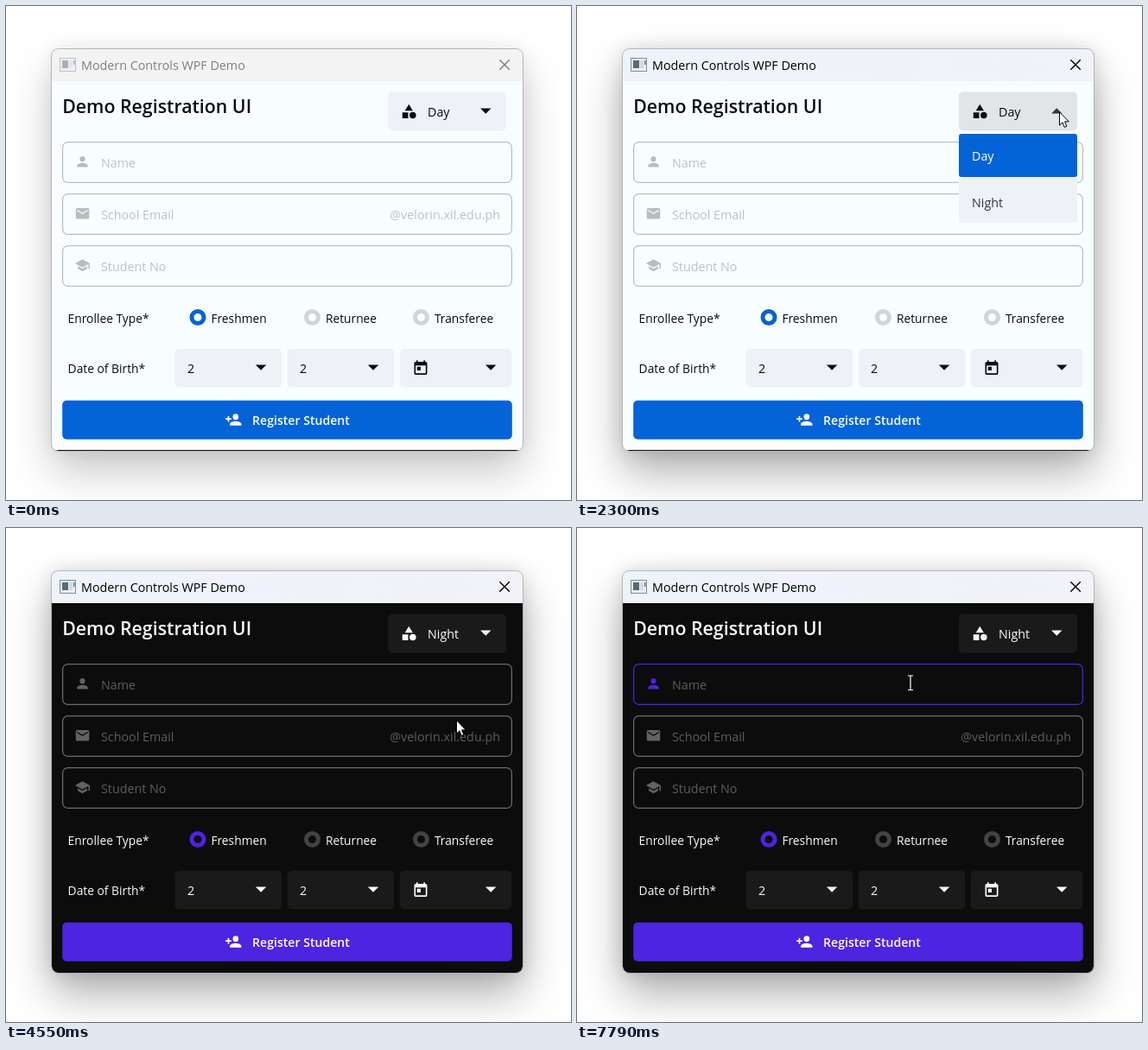
Animation, 654 px wide and 572 px high, one loop 8000 ms. Source, as an HTML page:

```html
<!DOCTYPE html>
<html lang="en">
<head>
<meta charset="utf-8">
<title>Registration form</title>
<style>
html, body { margin: 0; width: 100%; height: 100%; overflow: hidden; background: #fff; }
#shadow {
  position: absolute; left: 53px; top: 50px; width: 545px; height: 465px; border-radius: 8px;
  box-shadow: 0 24px 50px rgba(0, 0, 0, calc(.22 + .1 * var(--active))),
              0 0 22px rgba(0, 0, 0, calc(.07 + .06 * var(--active)));
}
svg { position: absolute; left: 0; top: 0; font: 14.3px "Open Sans", "Noto Sans", sans-serif; }
svg {
  --body: #f8feff; --box: #eef1f5; --line: #b9c0c2; --hint: #bcc2c4; --mark: #b9bdbe;
  --ring: #d2d5d6; --ink: #0a0a14; --accent: #0463d7; --edge: #111;
}
svg.night {
  --body: #0c0c0c; --box: #1a1a1a; --line: #6b6b6b; --hint: #5d5d5d; --mark: #626262;
  --ring: #434343; --ink: #fafafa; --accent: #4d24e0; --edge: #0c0c0c;
}
text, .ink { fill: var(--ink); }
.label { font-size: 13.8px; }
.field { fill: none; stroke: var(--line); stroke-width: 1.25; }
.hint { fill: var(--hint); }
.mark { fill: var(--mark); }
.box { fill: var(--box); }
.ring { fill: none; stroke: var(--ring); stroke-width: 5; }
.ring.on { stroke: var(--accent); }
.accent { fill: var(--accent); }
.white { fill: #fff; }
.open .theme { fill: #e1e5e8; }
.open #themeArrow { fill: #33373b; }
#title text { fill: #000; }
</style>
</head>
<body>
<div id="shadow"></div>
<svg id="stage" width="654" height="572" viewBox="0 0 654 572">
  <defs>
    <linearGradient id="barFill"><stop stop-color="#eef3fb"/><stop offset="1" stop-color="#f2f2f9"/></linearGradient>
    <clipPath id="frame"><rect x="53" y="50" width="545" height="465" rx="8"/></clipPath>
    <path id="account" d="M12 4a4 4 0 0 1 0 8a4 4 0 0 1 0-8M12 14c4.42 0 8 1.79 8 4v2H4v-2c0-2.21 3.58-4 8-4z"/>
    <path id="email" d="M20 8l-8 5-8-5V6l8 5 8-5M20 4H4a2 2 0 0 0-2 2v12a2 2 0 0 0 2 2h16a2 2 0 0 0 2-2V6a2 2 0 0 0-2-2z"/>
    <path id="school" d="M12 3L1 9l11 6 9-4.91V17h2V9M5 13.18v4L12 21l7-3.82v-4L12 17z"/>
    <path id="shapes" d="M11 13.5v8H3v-8zM12 2l5.5 9h-11zM17.5 13a4.5 4.5 0 0 1 0 9a4.5 4.5 0 0 1 0-9z"/>
    <path id="add" d="M15 14c-2.67 0-8 1.33-8 4v2h16v-2c0-2.67-5.33-4-8-4M6 10V7H4v3H1v2h3v3h2v-3h3v-2M15 12a4 4 0 0 0 0-8a4 4 0 0 0 0 8z"/>
    <path id="calendar" d="M7 10h5v5H7M19 19H5V8h14M19 3h-1V1h-2v2H8V1H6v2H5a2 2 0 0 0-2 2v14a2 2 0 0 0 2 2h14a2 2 0 0 0 2-2V5a2 2 0 0 0-2-2z"/>
    <path id="arrow" d="M-6.2-3h12.4L0 3.2z"/>
  </defs>

  <g clip-path="url(#frame)">
    <rect x="53" y="50" width="545" height="37" fill="#f3f3f4"/>
    <rect id="bar" x="53" y="50" width="545" height="37" fill="url(#barFill)"/>
    <rect x="53" y="87" width="545" height="428" style="fill:var(--body)"/>
    <rect x="53" y="514" width="545" height="1" style="fill:var(--edge)"/>
  </g>
  <rect x="52.5" y="49.5" width="546" height="466" rx="8" fill="none" stroke="#b3b7ba"/>

  <g id="title">
    <rect x="62.5" y="60.5" width="18" height="15" fill="#eceff1" stroke="#858b90"/>
    <rect x="65" y="63" width="7" height="9" fill="#566b80"/>
    <rect x="73" y="63" width="4" height="9" fill="#d3d9de"/>
    <rect x="78" y="63" width="1.5" height="5" fill="#3f78c8"/>
    <text x="87" y="74">Modern Controls WPF Demo</text>
    <path d="M571.3 62.3l11.5 11.5m0-11.5l-11.5 11.5" stroke="#000" stroke-width="1.4"/>
  </g>

  <text x="65.2" y="124" font-size="21.3" font-weight="600">Demo Registration UI</text>
  <g id="form"></g>

  <rect class="box theme" x="442" y="99.5" width="137" height="45" rx="5"/>
  <text id="choice" x="488" y="128"></text>
  <use id="themeArrow" class="ink" href="#arrow"/>

  <g id="popup">
    <rect class="box" x="442" y="148" width="137" height="103" rx="3"/>
    <rect class="accent" x="442" y="148" width="137" height="50" rx="3"/>
    <text class="white" x="457" y="179">Day</text>
    <text x="457" y="233" style="fill:#33363c">Night</text>
  </g>

  <rect id="caret" class="ink" x="112" y="170" width="1.3" height="21"/>
  <path id="pointer" d="M.5.7v15.4l3.5-3.3 2.3 5.6 2.6-1.1-2.3-5.4h4.7z" fill="#fff" stroke="#000"/>
  <path id="beam" d="M-3-8h2.5l.5.5.5-.5H3M0-7.5V8M-3 8.5h2.5L0 8l.5.5H3" fill="none" stroke="#fff" stroke-width="1.2"/>
</svg>
<script>
const $ = id => document.getElementById(id);
const stage = $("stage");

const icon = (name, x, y, cls = "ink", size = 20) =>
  `<use href="#${name}" class="${cls}" transform="translate(${x} ${y}) scale(${size / 24})"/>`;
const text = (s, x, y, cls = "", extra = "") => `<text class="${cls}" x="${x}" y="${y}" ${extra}>${s}</text>`;
const arrow = (x, y) => `<use href="#arrow" class="ink" x="${x}" y="${y}"/>`;

const field = (hint, name, y, id) => `<g id="${id}">
  <rect class="field" x="65.6" y="${y}" width="519.8" height="46.8" rx="6"/>
  ${icon(name, 79.2, y + 13.4, "mark", 18.6)}${text(hint, 110, y + 29.4, "hint")}</g>`;
const radio = (s, x, on = "") =>
  `<circle class="ring ${on}" cx="${x}" cy="360.5" r="7"/>` + text(s, x + 15.4, 367, "label");
const combo = (x, w, content) =>
  `<rect class="box" x="${x}" y="397" width="${w}" height="44.5" rx="5"/>${content}` + arrow(x + w - 24.1, 418.5);

$("form").innerHTML =
  field("Name", "account", 157.6, "name") +
  field("School Email", "email", 217.6, "mail") +
  field("Student No", "school", 277.6, "number") +
  text("@velorin.xil.edu.ph", 572, 247, "hint", 'text-anchor="end"') +
  text("Enrollee Type*", 71.6, 367, "label") +
  radio("Freshmen", 222, "on") + radio("Returnee", 354.5) + radio("Transferee", 480.5) +
  text("Date of Birth*", 71.6, 425, "label") +
  combo(195.5, 123.7, text("2", 210, 425)) +
  combo(325.7, 123.5, text("2", 340, 425)) +
  combo(455.8, 129.5, icon("calendar", 470, 409.5)) +
  '<rect class="accent" x="65.2" y="456.8" width="520.6" height="45" rx="5"/>' +
  icon("add", 253.3, 469, "white") +
  text("Register Student", 285, 485, "label white", 'style="font-size:14.1px" font-weight="600"');
$("choice").insertAdjacentHTML("beforebegin", icon("shapes", 456.3, 112));

// Pointer path: time, x, y
const path = [
  [1060, 646, 182], [1340, 594, 142], [1550, 568, 126], [1760, 558, 122],
  [2900, 558, 122], [3310, 536, 172], [3730, 521, 214], [4090, 521, 222],
  [5670, 521, 222], [6230, 435, 215], [6510, 406, 204], [6790, 386, 179], [8000, 386, 179]
];

function pointerAt(t) {
  const phase = t < 2000 ? 10 : t < 5000 ? 30 : 0;
  const q = Math.max(1060, t - (t - phase) % 70);
  const i = path.findIndex(p => p[0] > q);
  const [a, x, y] = path[i - 1], [b, x2, y2] = path[i];
  const k = (q - a) / (b - a);
  return [x + (x2 - x) * k, y + (y2 - y) * k];
}

const steps = (t, start, n) => Math.min(1, Math.max(0, (Math.floor((t - start) / 70) + 1) / n));
const show = (el, on) => { el.style.opacity = +on; };

function draw(t) {
  const night = t >= 4550, open = t >= 2090 && !night;
  const active = steps(t, 2090, 4);
  stage.setAttribute("class", night ? "night" : open ? "open" : "");

  $("shadow").style.setProperty("--active", active);
  show($("bar"), active);
  const idle = t < 70 ? .48 : t < 130 ? .46 : .44;
  show($("title"), idle + (1 - idle) * active);

  $("choice").textContent = night ? "Night" : "Day";
  $("themeArrow").setAttribute("transform", `translate(555.3 121.5) scale(1 ${open ? -1 : 1})`);
  show($("popup"), t < 4350 ? active : t < 4480 ? .5 : 0);

  const focus = steps(t, 7190, 3);
  const tint = base => `color-mix(in srgb, var(--accent) ${focus * 100}%, ${base})`;
  const name = $("name");
  name.querySelector("rect").style.stroke = focus ? tint("#6b6b6b") : "";
  name.querySelector("use").style.fill = focus ? tint("#626262") : "";
  show($("caret"), t >= 7260 && t < 7790);

  const [x, y] = pointerAt(t);
  const beam = t >= 5740 && (y > 217 || y < 205);
  for (const id of ["pointer", "beam"]) $(id).setAttribute("transform", `translate(${x} ${y})`);
  show($("beam"), beam);
  show($("pointer"), t < 1060 || beam ? 0 : t >= 4480 && !night ? .5 : 1);
}

const start = performance.now();
function loop() {
  draw((performance.now() - start) % 8000);
  requestAnimationFrame(loop);
}
loop();
</script>
</body>
</html>
```
